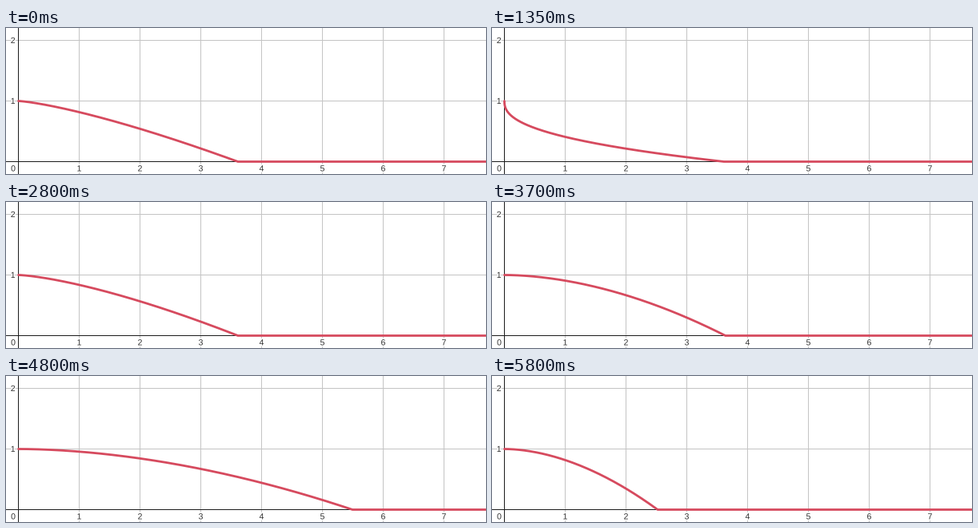
A matplotlib script for the animation above (6000 ms loop, 600 px wide and 183 px high).

```python
import math
import numpy as np
import matplotlib.pyplot as plt
from matplotlib.animation import FuncAnimation
from matplotlib.patheffects import withStroke

W, H, DPI = 600, 183, 100
PX = 72 / DPI                       # points per pixel
STEP, FRAMES = 50, 120
X0, Y0, UNIT = 15.5, 167.5, 76      # plot origin and unit length in pixels
GRID, AXIS, RED = "#c4c4c4", "#1c1c1c", "#d64a5e"


def swing(u):
    return (1 - math.cos(math.pi * u)) / 2


def release(u):
    return 1 - (1 - u) ** 1.1


def move(now, start, end, a, b, ease=swing):
    u = min(max((now - start) / (end - start), 0), 1)
    return a + (b - a) * ease(u)


def power(now):
    """Exponent: slides down, rests briefly, then climbs."""
    if now < 1700:
        return move(now, 0, 1550, 1.32, 0.37)
    return move(now, 1760, 3390, 0.37, 1.84)


def reach(now):
    """Where the curve meets zero: out to the right, then back."""
    if now < 4500:
        return move(now, 3650, 4500, 3.61, 6.49)
    return move(now, 4500, 5800, 6.49, 2.52, release)


fig = plt.figure(figsize=(W / DPI, H / DPI), dpi=DPI, facecolor="white")
ax = fig.add_axes([0, 0, 1, 1])
ax.set_xlim(0, W)
ax.set_ylim(H, 0)
ax.axis("off")


def vline(x, color):
    ax.plot([x, x], [0, H], color=color, lw=PX, snap=False)


def hline(y, color):
    ax.plot([0, W], [y, y], color=color, lw=PX, snap=False)


def label(x, y, text):
    ax.text(x, y, text, family="Liberation Sans", size=10.5 * PX,
            color="#333333", ha="center", va="center_baseline", zorder=4,
            path_effects=[withStroke(linewidth=3 * PX, foreground="white")])


for k in range(1, 8):
    vline(X0 + k * UNIT, GRID)
    label(X0 + k * UNIT, 175.5, str(k))
for k in (1, 2):
    hline(Y0 - k * UNIT, GRID)
    label(8.7, Y0 - k * UNIT - 0.5, str(k))
label(9, 175.5, "0")
hline(Y0, AXIS)
vline(X0, AXIS)

curve, = ax.plot([], [], color=RED, lw=2.8 * PX, zorder=3, snap=False,
                 solid_joinstyle="round", solid_capstyle="round")
S = np.linspace(0, 1, 300) ** 3     # denser near the steep start


def draw(frame):
    now = frame * STEP
    x = np.append(X0 + UNIT * reach(now) * S, W + 5)
    y = np.append(Y0 - UNIT * (1 - S ** power(now)), Y0)
    curve.set_data(x, y)
    return curve,


anim = FuncAnimation(fig, draw, frames=FRAMES, interval=STEP, repeat=True,
                     repeat_delay=0)
plt.show()
```
